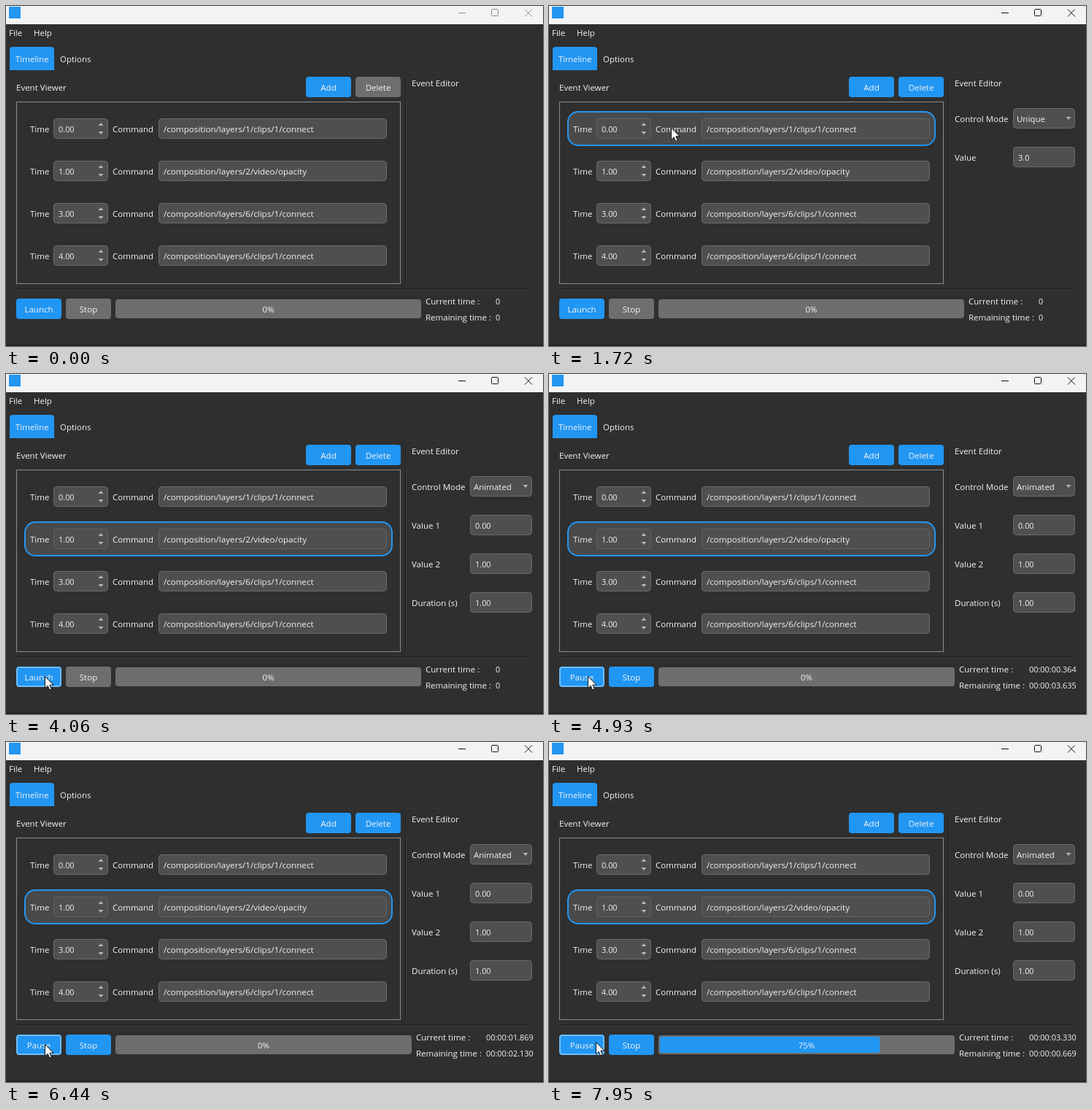
These frames come from a looping animation (736x466 px, 8 s). An HTML page:

```html
<!DOCTYPE html>
<html lang="en">
<head>
<meta charset="utf-8">
<title>Cue list</title>
<style>
html, body { margin: 0; width: 100%; height: 100%; overflow: hidden; background: #2f2f2f; }
svg { display: block; width: 736px; height: 466px; }
text { font: 11.5px "Open Sans", "Noto Sans", sans-serif; fill: #f4f4f4; white-space: pre; }
text.num { font-size: 10.9px; }
text.path { font-size: 11.65px; }
</style>
</head>
<body>
<svg id="stage" viewBox="0 0 736 466"></svg>
<script>
const LOOP = 8000, TOTAL = 3999;
const BLUE = '#2196f3', GREY = '#6e6e6e', FIELD = '#4f4f4f';
const stage = document.getElementById('stage');

function add(tag, attrs, parent = stage) {
  const el = document.createElementNS('http://www.w3.org/2000/svg', tag);
  for (const name in attrs) el.setAttribute(name, attrs[name]);
  return parent.appendChild(el);
}
const set = (el, attrs) => { for (const name in attrs) el.setAttribute(name, attrs[name]); };
const show = (el, on) => el.setAttribute('display', on ? 'inline' : 'none');
const group = () => add('g', {});
const rect = (x, y, width, height, fill, rx = 0, parent) =>
  add('rect', { x, y, width, height, fill, rx }, parent);
const path = (d, attrs, parent) => add('path', { d, ...attrs }, parent);

function text(x, y, content, attrs, parent) {
  const el = add('text', { x, y, ...attrs }, parent);
  el.textContent = content;
  return el;
}
function field(x, y, w, content, cls, parent, inset = 7) {
  const box = add('rect', { x: x + .5, y: y + .5, width: w - 1, height: 27, rx: 4,
    fill: FIELD, stroke: '#6b6b6b' }, parent);
  text(x + inset, y + 19, content, { class: cls }, parent);
  return box;
}
function button(x, y, label) {
  const box = rect(x, y, 62, 28, BLUE, 4);
  const caption = text(x + 31, y + 19, label, { 'text-anchor': 'middle' });
  return { box, caption };
}
function enable(btn, on) {
  set(btn.box, { fill: on ? BLUE : GREY });
  set(btn.caption, { fill: on ? '#f4f4f4' : '#dedede' });
}

// Window chrome
rect(0, 0, 736, 466, '#2f2f2f');
rect(0, 464, 736, 2, '#252329');
rect(0, 0, 736, 25, '#f3f3f3');
rect(4, 1, 16, 16, BLUE);
const title = text(26, 14, 'MZQ Cuelists v1.0 - timeline.json');
const controls = path('M620 9.5h10M666.5 4.5h7q1 0 1 1v7q0 1-1 1h-7q-1 0-1-1v-7q0-1 1-1zM711 4.5l10 10M721 4.5l-10 10',
  { fill: 'none' });
text(4, 41, 'File');
text(38, 41, 'Help');
path('M5 88V60q0-4 4-4h53q4 0 4 4v28z', { fill: BLUE });
text(13, 77, 'Timeline');
text(74, 77, 'Options');

// Event list
text(14, 116, 'Event Viewer');
button(411, 97, 'Add');
const deleteButton = button(479, 97, 'Delete');
add('rect', { x: 14.5, y: 131.5, width: 526, height: 249, fill: 'none', stroke: '#8d8d8d' });
path('M547.5 97V381M14 387.5H721', { stroke: '#1f1f1f' });
path('M548.5 97V381M14 388.5H721', { stroke: '#393939' });

const selection = add('rect', { x: 26, y: 145, width: 503, height: 46, rx: 14,
  fill: '#494949', stroke: BLUE, 'stroke-width': 2 });
const events = [
  ['0.00', '/composition/layers/1/clips/1/connect'],
  ['1.00', '/composition/layers/2/video/opacity'],
  ['3.00', '/composition/layers/6/clips/1/connect'],
  ['4.00', '/composition/layers/6/clips/1/connect']
];
const rows = events.map(([time, command], i) => {
  const y = 154 + 58 * i;
  text(33, y + 19, 'Time');
  const spin = field(65, y, 75, time, 'num');
  path(`M126.5 ${y + 10}h7l-3.5-4zM126.5 ${y + 18}h7l-3.5 4z`, { fill: '#b4b4b4' });
  text(146, y + 19, 'Command');
  return [spin, field(209, y, 313, command, 'path')];
});

// Event editor
text(556, 110, 'Event Editor');
function editor(mode, values) {
  const g = group();
  text(556, 159, 'Control Mode', {}, g);
  field(636, 140, 85, mode, '', g, 5);
  path('M708.5 152h7l-3.5 4z', { fill: '#b4b4b4' }, g);
  values.forEach(([label, value], i) => {
    const y = 193 + 53 * i;
    text(556, y + 19, label, {}, g);
    field(636, y, 85, value, 'num', g);
  });
  return g;
}
const editors = [
  editor('Unique', [['Value', '3.0']]),
  editor('Animated', [['Value 1', '0.00'], ['Value 2', '1.00'], ['Duration (s)', '1.00']])
];

// Transport
const launchButton = button(14, 401, 'Launch');
const focusRing = add('rect', { x: 15, y: 402, width: 60, height: 26, rx: 3.5,
  fill: 'none', stroke: '#72bdf8', 'stroke-width': 2 });
const stopButton = button(82, 401, 'Stop');
const bar = rect(150, 402, 419, 26, GREY, 4);
const fill = rect(152, 404, 0, 22, BLUE, 3);
const percent = text(359, 420, '0%', { 'text-anchor': 'middle' });
const labels = [text(575, 409, 'Current time :'), text(575, 431, 'Remaining time :')];
const clocks = [text(671, 409, '0', { class: 'num' }), text(671, 431, '0', { class: 'num' })];

// Pointer
const halo = add('circle', { r: 12, fill: '#d0b010', opacity: .62 });
const cursor = path('M0 0V16.2L3.7 12.7 6.2 18.5 8.8 17.4 6.4 11.7H11.6Z',
  { fill: '#fff', stroke: '#111', 'stroke-width': 1 });

// Screen refreshes: start, end, number of steps
const refreshes = [
  [70, 130, 2], [470, 960, 8], [1450, 1720, 5], [2070, 2610, 8], [2750, 2750, 1],
  [2890, 2960, 2], [3310, 3310, 1], [3590, 4060, 8], [4460, 5200, 11],
  [5270, 6040, 12], [6110, 6900, 13], [6980, 7740, 12], [7810, 7950, 3]
];
const pointerKeys = [[400, 300, 474], [960, 167.5, 167], [2000, 167.5, 167], [2610, 153.5, 224],
  [3520, 153.5, 224], [4060, 53.5, 414.5], [7740, 53.5, 414.5], [7950, 64.5, 411.5]];
const clockKeys = [[4530, 0], [5620, 1062], [6440, 1870], [7950, 3330]];
const presses = [[1450, 1640], [2750, 2950], [4460, 4600]];

function snap(t) {
  let last = 0;
  for (const [start, end, steps] of refreshes) {
    if (t < start) break;
    const gap = (end - start) / (steps - 1) || 1;
    last = start + gap * Math.min(steps - 1, Math.floor((t - start) / gap + 1e-6));
  }
  return last;
}
function track(keys, t, ease = u => u) {
  if (t <= keys[0][0]) return keys[0].slice(1);
  for (let i = 1; i < keys.length; i++) {
    const [t0, ...a] = keys[i - 1], [t1, ...b] = keys[i];
    if (t <= t1) {
      const u = ease((t - t0) / (t1 - t0));
      return a.map((v, k) => v + (b[k] - v) * u);
    }
  }
  return keys[keys.length - 1].slice(1);
}
const smooth = u => u * u * (3 - 2 * u);
const clock = ms => '00:00:' + (Math.round(ms) / 1000).toFixed(3).padStart(6, '0');

function render(now) {
  const t = snap(now);
  const active = t >= 1450;
  const selected = t >= 2885 ? 1 : t >= 1580 ? 0 : -1;
  const running = t >= 4530;

  set(title, { fill: active ? '#111' : '#5c5c5c' });
  set(controls, { stroke: active ? '#111' : '#8a8a8a' });
  enable(deleteButton, selected >= 0);
  show(selection, selected >= 0);
  set(selection, { y: 145 + 58 * Math.max(0, selected) });
  rows.forEach((boxes, i) => boxes.forEach(box =>
    set(box, { stroke: i === selected ? '#636363' : '#6b6b6b' })));
  editors.forEach((g, i) => show(g, i === selected));

  const [x, y] = track(pointerKeys, t, smooth);
  set(cursor, { transform: `translate(${x} ${y})` });
  set(halo, { cx: x, cy: y });
  show(cursor, t >= 470);
  show(halo, presses.some(([a, b]) => t >= a && t < b));

  const elapsed = track(clockKeys, t)[0];
  const progress = elapsed >= 3000 ? 75 : elapsed >= 2000 ? 25 : 0;
  const width = running ? 406 : 419;
  launchButton.caption.textContent = running ? 'Pause' : 'Launch';
  show(focusRing, t >= 3985);
  enable(stopButton, running);
  set(bar, { width });
  set(fill, { width: progress ? (width - 4) * progress / 100 : 0 });
  set(percent, { x: 150 + width / 2 });
  percent.textContent = progress + '%';
  labels.forEach(el => set(el, { x: running ? 562 : 575 }));
  clocks.forEach((el, i) => {
    set(el, { x: running ? 658 : 671 });
    const ms = Math.round(elapsed);
    el.textContent = running ? clock(i ? TOTAL - ms : ms) : '0';
  });
}

const begin = performance.now();
function tick() {
  render((performance.now() - begin) % LOOP);
  requestAnimationFrame(tick);
}
render(0);
requestAnimationFrame(tick);
</script>
</body>
</html>
```
